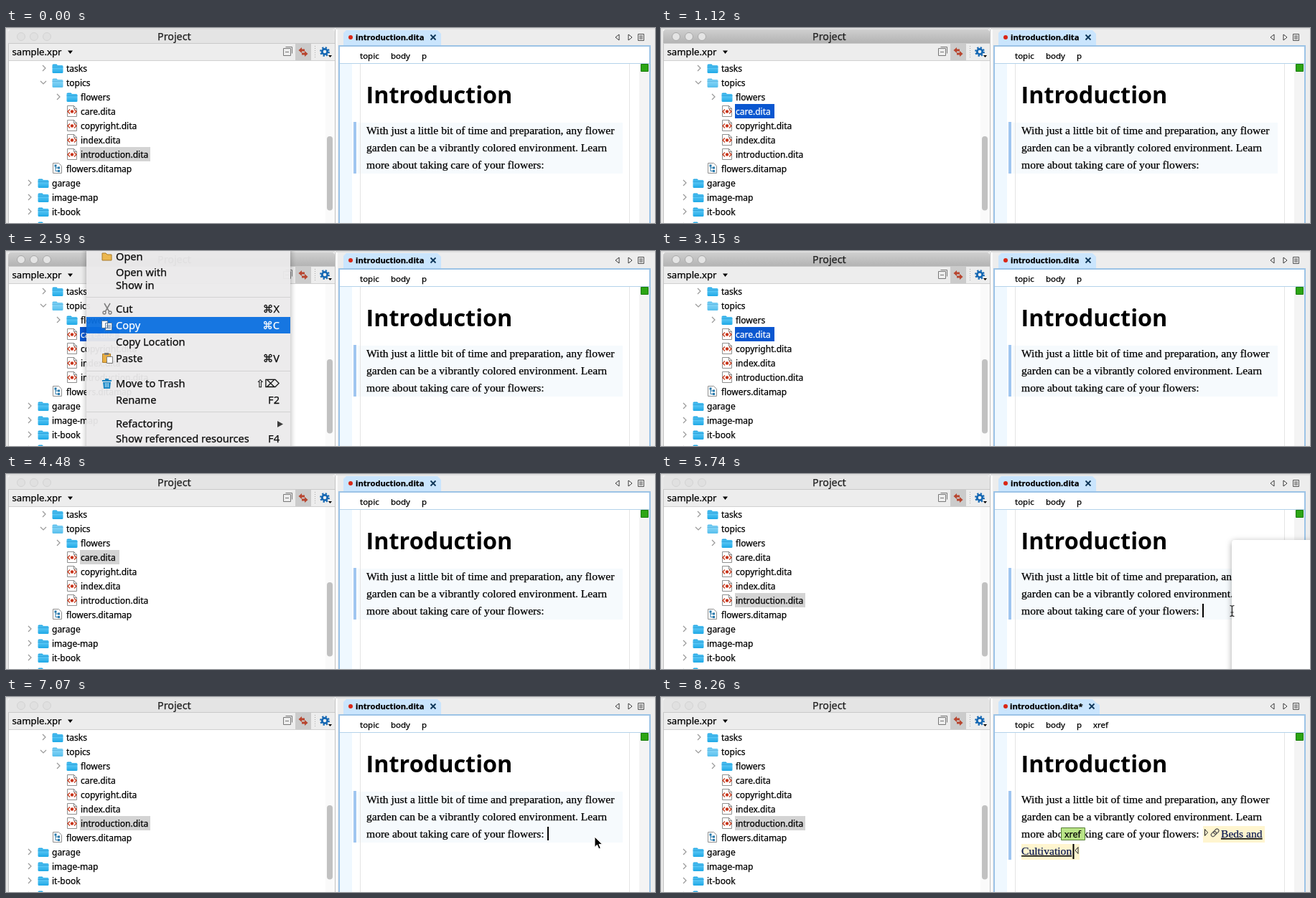
Animation, 904 px wide and 272 px high, one loop 8470 ms. Source, as an HTML page:

```html
<!DOCTYPE html>
<html lang="en">
<head>
<meta charset="utf-8">
<title>Copying a topic as a link</title>
<style>
html, body { margin: 0; width: 100%; height: 100%; overflow: hidden; background: #fff; }
svg { display: block; font-family: "Noto Sans", "DejaVu Sans", sans-serif; font-size: 12px; white-space: pre; color: #000; }
text { fill: currentColor; stroke: currentColor; stroke-width: .25px; }
.serif { font: 15.6px "Liberation Serif", serif; }
.heading { font: bold 32.4px "Open Sans", sans-serif; stroke: none; }
.menu { font-size: 14.6px; }
.key { text-anchor: end; }
.line { fill: none; stroke: #555; }
</style>
</head>
<body>
<svg id="stage" width="904" height="272" viewBox="0 0 904 272">
  <defs>
    <linearGradient id="steel" x2="0" y2="1">
      <stop stop-color="#cfcfcf"/><stop offset="1" stop-color="#b2b2b2"/>
    </linearGradient>
    <linearGradient id="sky" x2="0" y2="1">
      <stop stop-color="#1ea4e2"/><stop offset=".3" stop-color="#5cc8f6"/><stop offset="1" stop-color="#1fa9e6"/>
    </linearGradient>
    <filter id="shadow" x="-20%" y="-20%" width="140%" height="140%">
      <feDropShadow dx="0" dy="2" stdDeviation="4" flood-opacity=".35"/>
    </filter>
    <g id="folder">
      <path d="M0 2q0-1.500 1.500-1.500h4.500l1.500 1.500h6q1.500 0 1.500 1.500v8q0 1.500-1.500 1.500h-12q-1.500 0-1.500-1.500z" fill="url(#sky)"/>
      <path d="M0 4.500h15" stroke="#148fce" stroke-width=".7"/>
    </g>
    <g id="file">
      <path d="M.5.5h9l4 4v11h-13z" fill="#fff" stroke="#8f8f8f"/>
      <path d="M9.500.5v4h4" class="line" stroke-width=".7"/>
      <path d="M4 5.500l-3 3 3 3M10 5.500l3 3-3 3" fill="none" stroke="#c8472b" stroke-width="1.500"/>
      <circle cx="7" cy="8.500" r="2.200" fill="#c8331a"/>
    </g>
    <g id="map">
      <path d="M.5.5h8l4 4v10h-12z" fill="#fff" stroke="#8f8f8f"/>
      <path d="M4 4v7.500h4M4 7h4" fill="none" stroke="#2878aa"/>
      <path d="M2.500 2.500h3v3h-3zM7 5.500h3v3H7zM7 10h3v3H7z" fill="#2878aa"/>
    </g>
    <path id="arrow" d="M0 0v14.500l3.400-3.200 2.400 5.500 2.500-1-2.400-5.400h4.700z" stroke="#fff"/>
    <path id="beam" d="M-3-7.500q3 0 3 2v11q0 2-3 2M3-7.500q-3 0-3 2v11q0 2 3 2M-2 2h4" fill="none" stroke="#222" stroke-width="1.200"/>
  </defs>

  <!-- Project window -->
  <rect width="904" height="272" fill="#f4f4f4"/>
  <path d="M0 0h458v2H0z" fill="#dedede"/>
  <path d="M0 2h3v270H0z" fill="#e8e8e8"/>
  <path id="bar" d="M3 22V7q0-5 5-5h445q5 0 5 5v15z" fill="#e4e4e4"/>
  <g fill="#e0e0e0" stroke="#d3d3d3"><circle cx="21" cy="12" r="5.500"/><circle cx="39" cy="12" r="5.500"/><circle cx="57" cy="12" r="5.500"/></g>
  <g data-t="1050-4410">
    <use href="#bar" style="fill:url(#steel)"/>
    <path d="M3 22V7q0-5 5-5h445q5 0 5 5v15z" fill="url(#steel)"/>
    <g fill="#e4e4e4" stroke="#a9a9a9"><circle cx="21" cy="12" r="5.500"/><circle cx="39" cy="12" r="5.500"/><circle cx="57" cy="12" r="5.500"/></g>
  </g>
  <text x="211" y="17" font-size="14.300" color="#222">Project</text>
  <path d="M3 21.500h455" stroke="#c9c9c9"/>
  <path d="M3 22h455v24H3z" fill="#ededed"/>
  <text x="8.500" y="38" font-size="13.200">sample.xpr</text>
  <path d="M86 31.500h7l-3.500 4.500z"/>
  <path d="M389.500 26.500h9v9M386.500 28.500h10v10h-10zM389 33.500h5" class="line" style="stroke:#777"/>
  <path d="M403 22h22v23h-22z" fill="#cbcbcb"/>
  <path d="M407.500 31l4.500-4v2.500h4v3h-4v2.500zM420.500 36l-4.500-4v2.500h-4v3h4v2.500z" fill="#b8452f"/>
  <path d="M430.500 25v17" stroke="#aaa" stroke-dasharray="1 2"/>
  <circle cx="444" cy="33" r="5.700" fill="none" stroke="#1668b3" stroke-width="2.400" stroke-dasharray="2.200 2.280"/>
  <circle cx="444" cy="33" r="3.700" fill="none" stroke="#1668b3" stroke-width="2.800"/>
  <path d="M449 38h5l-2.500 3z"/>
  <path d="M4 46h454v226H4z" fill="#fff"/>
  <path d="M3.500 22v250M458.500 2v270" stroke="#c4c4c4"/>
  <path d="M4 45.500h454" stroke="#d0d0d0"/>
  <path d="M445 46h13v226h-13z" fill="#fafafa"/>
  <rect x="447" y="151" width="8" height="103.500" rx="4" fill="#c1c1c1"/>
  <path d="M103 166h98v20h-98z" fill="#d4d4d4" data-t="0-1050,4760-8470"/>
  <path d="M103 106h55v20h-55z" fill="#0a57d0" data-t="1050-4410"/>
  <path d="M103 106h55v20h-55z" fill="#d4d4d4" data-t="4410-4760"/>
  <g id="tree"></g>

  <!-- Editor -->
  <path d="M459 0h445v272H459z" fill="#ededed"/>
  <path d="M459 0h445v2H459z" fill="#e0e0e0"/>
  <path d="M459 2h3v270h-3z" fill="#fafafa"/>
  <path d="M470 24V7l4-4h127l5 5v16z" fill="#cae5fd"/>
  <path d="M604 24V7l7 4v13z" fill="#cae5fd" data-t="7140-8470"/>
  <path d="M463 24h435v248h-435z" fill="#9cc3e6"/>
  <path d="M465 26h431v246H465z" fill="#fff"/>
  <path d="M465 49.500h431" stroke="#b4d2ea"/>
  <circle cx="480" cy="13" r="3" fill="#d92616"/>
  <g font-weight="600" font-size="11.200">
    <text x="487" y="17" data-t="0-7140">introduction.dita</text>
    <text x="486" y="17" data-t="7140-8470">introduction.dita*</text>
  </g>
  <path id="close" d="M591.500 9.500l7 7m0-7l-7 7" stroke="#0d3557" stroke-width="1.800"/>
  <path d="M854 9v8l-5-4zM867 9v8l5-4z" fill="#fff" stroke="#333"/>
  <path d="M880.500 8.500h8v9h-8zM882 11h5m-5 2h5m-5 2h5" class="line"/>
  <g font-size="11.500">
    <text x="493" y="43">topic</text><text x="536" y="43">body</text><text x="579" y="43">p</text>
    <text x="602" y="43" data-t="7630-8470">xref</text>
  </g>
  <path d="M465 50h17v222h-17z" fill="#eff8ff"/>
  <path d="M882 50h14v222h-14z" fill="#f4f4f4"/>
  <path d="M884.500 50.500h10v10h-10z" fill="#2ca514" stroke="#187c08"/>
  <path d="M489 132h370v71H489z" fill="#f6fafd" data-t="0-7630"/>
  <path d="M493.500 50v222M868.500 50v222" stroke="#e4e4e4"/>
  <path d="M484 131h4v72h-4z" fill="#a0c6f0"/>
  <g data-t="7630-8470">
    <path d="M484 203h4v24h-4z" fill="#a0c6f0"/>
    <path d="M755 180h86v23h-86zM502 205h81v22h-81z" fill="#fff5cf"/>
  </g>
  <text x="501.500" y="105" class="heading">Introduction</text>
  <g class="serif">
    <text x="502" y="148">With just a little bit of time and preparation, any flower</text>
    <text x="502" y="172">garden can be a vibrantly colored environment. Learn</text>
    <text x="502" y="196">more about taking care of your flowers:</text>
    <g data-t="7630-8470">
      <g color="#0c1a52" text-decoration="underline"><text x="780" y="196">Beds and </text><text x="502" y="220">Cultivation</text></g>
      <path d="M757.500 184.500v9l4-4.500zM581 209.500v9l-4-4.500z" fill="#fff8d8" stroke="#222"/>
      <g class="line" transform="rotate(-45 772 189)" stroke-width="1.200"><rect x="765" y="186.500" width="8" height="5" rx="2.500"/><rect x="770" y="186.500" width="8" height="5" rx="2.500"/></g>
    </g>
  </g>
  <path d="M754 181h2v19h-2z" data-t="5460-7630"/>
  <path d="M573.500 205h2v21h-2z" data-t="8190-8470"/>
  <g data-t="7700-8470">
    <path d="M557.500 182.500h33v17h-33z" fill="#b9e487" stroke="#598238"/>
    <text x="562" y="196" font-size="12.500">xref</text>
  </g>

  <!-- Tree menu -->
  <g id="fileMenu" data-t="1680-3150">
    <path id="sheet" d="M112-20h284v310H112z" filter="url(#shadow)"/>
    <g class="menu" data-t="1750-3150">
      <path d="M112 92h284v23H112z" fill="#0a6fe0" data-t="2590-3150"/>
      <g id="fileItems"></g>
      <path d="M112 64.500h284M112 167.500h284M112 224.500h284" stroke="#d0d0d0"/>
      <path d="M378 237l8 4.500-8 4.500z" fill="#333"/>
      <path d="M134 13V3h5l2 2h6v8z" fill="#efb84b" stroke="#a97820"/>
      <path d="M137 73l7 12m1-12l-7 12" stroke="#777" stroke-width="1.500"/>
      <g fill="none" stroke="#777" stroke-width="1.300"><circle cx="137" cy="86" r="2"/><circle cx="145" cy="86" r="2"/></g>
      <path d="M133.500 97.500h8v10h-8zM138.500 100.500h9v10h-9zM140 103.500h6m-6 2h6m-6 2h6" fill="#fff" stroke="#52779b"/>
      <path d="M134.500 143.500h11v12h-11z" fill="#e7aa3b" stroke="#a97820"/>
      <path d="M137 142h6v3h-6z" fill="#777"/><path d="M140.500 147.500h8v9h-8z" fill="#fff" stroke="#777"/>
      <path d="M134 180h13v2h-13zm4-2h5v2h-5zm-3 5h11l-1 9h-9z" fill="#1684c4"/>
      <path d="M138.500 184v6m2-6v6m2-6v6" stroke="#a8dcf5"/>
    </g>
  </g>

  <!-- Editor menu -->
  <g data-t="5740-7000">
    <path id="pane" d="M795 290V97q0-5 5-5h130v198z" filter="url(#shadow)"/>
    <g class="menu" id="editItems" data-t="5810-7000"></g>
  </g>

  <use href="#arrow" x="147" y="123" data-t="1190-1470"/>
  <use href="#arrow" x="112" y="123" data-t="1470-2240"/>
  <use href="#beam" x="795.500" y="191" data-t="4760-6300"/>
  <use href="#arrow" x="820" y="195" data-t="7000-7630"/>
</svg>
<script>
const LOOP = 8470;
const $ = id => document.getElementById(id);
const label = (x, y, s, cls = '') => `<text x="${x}" y="${y}" class="${cls}">${s}</text>`;

// Each row: name, indent in pixels, icon, chevron
const rows = [
  ['tasks', 64, 'folder', 'right'], ['topics', 64, 'folder', 'down'], ['flowers', 84, 'folder', 'right'],
  ['care.dita', 84, 'file'], ['copyright.dita', 84, 'file'], ['index.dita', 84, 'file'],
  ['introduction.dita', 84, 'file'], ['flowers.ditamap', 64, 'map'], ['garage', 44, 'folder', 'right'],
  ['image-map', 44, 'folder', 'right'], ['it-book', 44, 'folder', 'right'], ['', 44, 'folder', 'right']
];
const chevrons = { right: 'm-13-4l4 4-4 4', down: 'm-16-2l4 4 4-4' };
$('tree').innerHTML = rows.map(([name, x, icon, chevron], i) => {
  const y = 56 + 20 * i;
  const top = y - (icon === 'folder' ? 6 : 8);
  return `<use href="#${icon}" x="${x + (icon === 'folder' ? .5 : 1)}" y="${top}" opacity="${chevron === 'down' ? .75 : 1}"/>` +
    (chevron ? `<path d="M${x} ${y}${chevrons[chevron]}" fill="none" stroke="#999" stroke-width="1.200"/>` : '') +
    label(x + 20, y + 5, name);
}).join('');
const careLabel = $('tree').querySelectorAll('text')[3];

const fileItems = [
  ['Open', 13], ['Open with', 35], ['Show in', 53], ['Cut', 86, '⌘X'], ['Copy', 109, '⌘C'],
  ['Copy Location', 132], ['Paste', 155, '⌘V'], ['Move to Trash', 190, '⇧⌦'],
  ['Rename', 213, 'F2'], ['Refactoring', 246], ['Show referenced resources', 267, 'F4']
];
$('fileItems').innerHTML = fileItems.map(([name, y, key = '']) =>
  `<g${name === 'Copy' ? ' id="copy"' : ''}>${label(153, y, name)}${label(381, y, key, 'key')}</g>`).join('');

const editItems = [['Edit Attributes…', 114], ['Cut', 147], ['Copy', 170], ['Paste', 193], ['Insert', 226], ['Select', 249]];
$('editItems').innerHTML = editItems.map(([name, y]) => label(836, y, name)).join('') +
  '<path d="M795 125.500h109M795 204.500h109M795 260.500h109" stroke="#d0d0d0"/>';

const timed = [...document.querySelectorAll('[data-t]')].map(el =>
  [el, el.dataset.t.split(',').map(span => span.split('-').map(Number))]);

function draw(now) {
  const t = now % LOOP;
  for (const [el, spans] of timed)
    el.style.display = spans.some(([from, to]) => t >= from && t < to) ? '' : 'none';
  $('sheet').style.fill = t < 1750 ? '#fff' : '#ebeaeb';
  $('pane').style.fill = t < 5810 ? '#fff' : '#ebeaeb';
  $('copy').style.color = t >= 2590 ? '#fff' : '#000';
  careLabel.style.color = t >= 1050 && t < 4410 ? '#fff' : '#000';
  $('fileMenu').style.opacity = t < 1750 ? 1 : t < 3010 ? .95 : t < 3080 ? .6 : .25;
  $('close').setAttribute('transform', `translate(${t < 7140 ? 0 : 5})`);
  requestAnimationFrame(draw);
}
requestAnimationFrame(draw);
</script>
</body>
</html>
```
